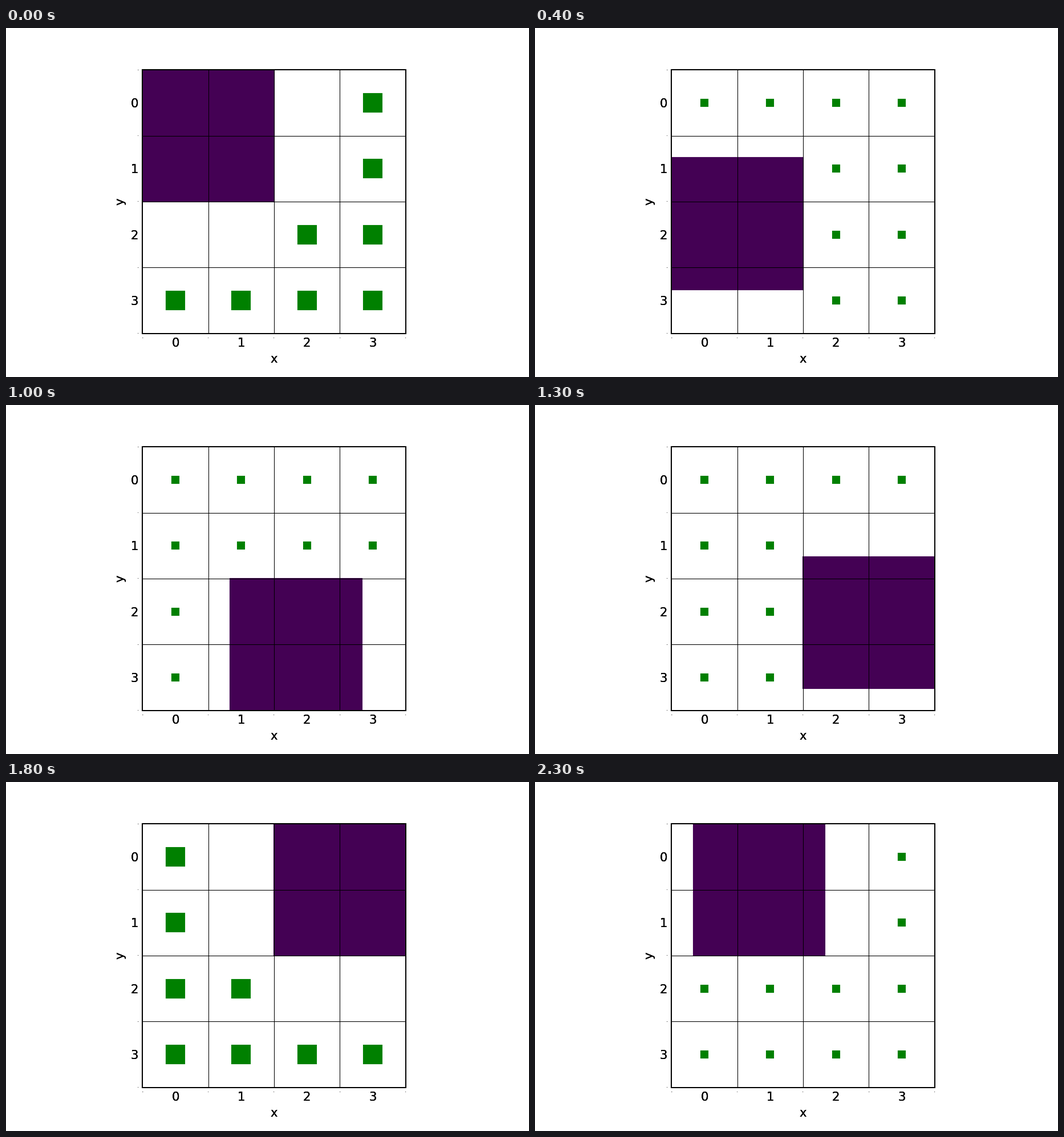
These frames come from a looping animation (917x611 px, 2.4 s). A matplotlib script:

```python
import itertools

import numpy as np
import matplotlib.pyplot as plt
from matplotlib.animation import FuncAnimation
from matplotlib.patches import Rectangle

DPI = 152.75
CELLS = 4
BOX = 2
SUBSTEPS = 3        # frames per one-cell move
PERIOD = 8          # moves per lap
EPS = 1e-6

plt.rcParams.update({"font.family": "DejaVu Sans", "font.size": 10})
fig = plt.figure(figsize=(917.01 / DPI, 4), dpi=DPI, facecolor="white")
fig.subplots_adjust(left=0.125, right=0.9, bottom=0.125, top=0.88)


def add_board():
    ax = fig.add_subplot(facecolor="none")
    ax.set(xlim=(0, CELLS), ylim=(CELLS, 0), aspect="equal",
           xlabel="x", ylabel="y")
    for axis in (ax.xaxis, ax.yaxis):
        axis.set_ticks(range(CELLS + 1), labels=range(CELLS + 1))
        axis.set_ticks(np.arange(CELLS) + 0.5, labels=range(CELLS), minor=True)
    ax.tick_params(which="both", length=0)
    ax.tick_params(which="major", labelsize=1)
    return ax


# Stacked boards darken the lettering and the frame.
board = [add_board() for _ in range(3)][0]
board.set_axisbelow(False)
board.grid(which="major", color="black", lw=0.5)

box = board.add_patch(Rectangle((0, 0), BOX, BOX, color="#440154", lw=1, zorder=1))
dots, = board.plot([], [], "s", color="green", zorder=2)


def corner(step):
    """Top-left corner of the box on its lap around the board."""
    turns = [0, 2, 4, 6]
    return (np.interp(step, turns, [0, 0, 2, 2], period=PERIOD),
            np.interp(step, turns, [0, 2, 2, 0], period=PERIOD))


def covers(pos, cell):
    return all(p - 1 + EPS < c < p + BOX - EPS for p, c in zip(pos, cell))


def update(i):
    step = i / SUBSTEPS
    box.set_xy(corner(step))
    # A cell is free when neither the arriving nor the leaving move sweeps it.
    around = [corner(step + d) for d in (-0.5 / SUBSTEPS, 0.5 / SUBSTEPS)]
    free = [c for c in itertools.product(range(CELLS), repeat=2)
            if not any(covers(p, c) for p in around)]
    dots.set_data([x + 0.5 for x, _ in free], [y + 0.5 for _, y in free])
    dots.set_markersize(15 if i % SUBSTEPS == 0 else 6)
    return box, dots


anim = FuncAnimation(fig, update, frames=PERIOD * SUBSTEPS, interval=100,
                     init_func=lambda: update(0), repeat=True, repeat_delay=0)
plt.show()
```
